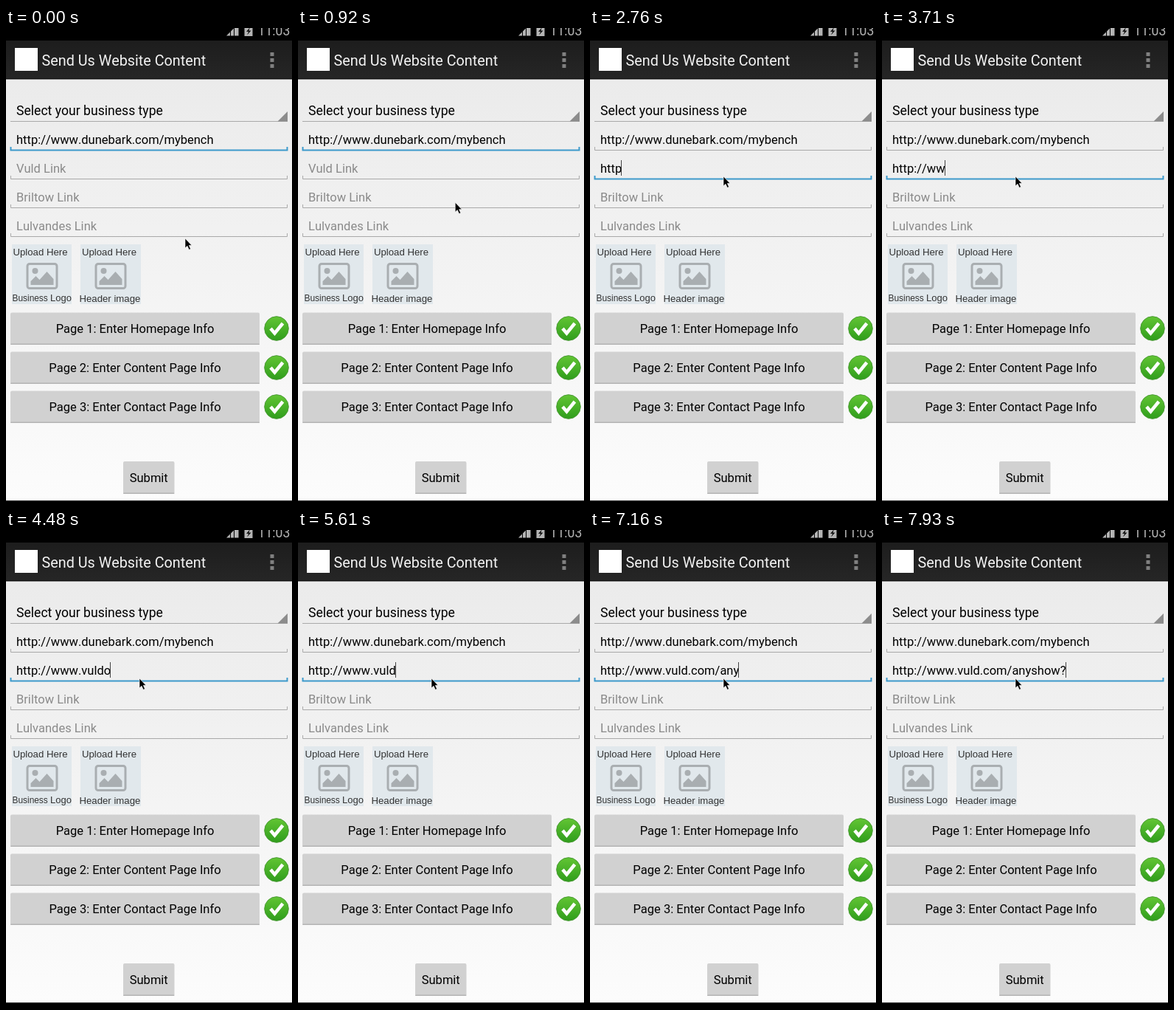
An HTML page for the animation above (8000 ms loop, 388 px wide and 642 px high).

```html
<!DOCTYPE html>
<html lang="en">
<head>
<meta charset="utf-8">
<title>Website content form</title>
<style>
  html, body { margin: 0; width: 100%; height: 100%; overflow: hidden; background: #f4f4f4; }
  svg { display: block; width: 388px; height: 642px; }
  text { font-family: Roboto, sans-serif; font-size: 16.5px; font-kerning: none; white-space: pre; }
  .thumb text { font-family: "Liberation Sans", Arial, sans-serif; font-size: 13.2px; fill: #333; }
  .mid { text-anchor: middle; }
  .hint { fill: #8a8a8a; }
  .line { fill: none; stroke: #a9a9a9; stroke-width: 1; }
  .focus { stroke: #3d9acb; stroke-width: 2; }
</style>
</head>
<body>
<svg viewBox="0 0 388 642" xmlns="http://www.w3.org/2000/svg">
  <defs>
    <linearGradient id="page" x2="0" y2="1">
      <stop offset="0" stop-color="#e9e9e9"/>
      <stop offset="1" stop-color="#fcfcfc"/>
    </linearGradient>
    <linearGradient id="bar" x2="0" y2="1">
      <stop offset="0" stop-color="#1d1d1d"/>
      <stop offset="1" stop-color="#262626"/>
    </linearGradient>
    <linearGradient id="green" x2="0" y2="1">
      <stop offset="0" stop-color="#62c534"/>
      <stop offset="1" stop-color="#2f9d1c"/>
    </linearGradient>
    <g id="picture" fill="#a9aeb1">
      <rect x="1.5" y="1.5" width="40" height="33" rx="3" fill="none" stroke="#a9aeb1" stroke-width="3"/>
      <circle cx="12" cy="11" r="4"/>
      <path d="M6 30V25L13 18L18 23L28 12L37 22V30Z"/>
    </g>
    <g id="tick">
      <circle r="16.3" fill="url(#green)" stroke="#4a9a35" stroke-width="1"/>
      <path d="M-8 0L-2.5 6.5L8.5 -7" fill="none" stroke="#fff" stroke-width="4.6"/>
    </g>
  </defs>

  <rect width="388" height="642" fill="url(#page)"/>
  <rect width="388" height="17" fill="#000"/>
  <g fill="#b4b4b4">
    <path d="M299 10.5L304 5.5V10.5ZM305 10.5V4.5L309 .5V10.5ZM310 10.5V0H315.500V10.500Z"/>
    <rect x="323.500" y="-3" width="11" height="14"/>
    <path d="M331 -1L326 5H329L327 9.500L332.500 3.500H329.500Z" fill="#111"/>
    <text x="341.500" y="9.500" style="font-size:17.600px">11:03</text>
  </g>

  <rect y="17" width="388" height="52" fill="url(#bar)"/>
  <rect y="68" width="388" height="1.500" fill="#111"/>
  <rect x="12" y="27" width="31" height="31" fill="#fff"/>
  <text x="48.500" y="51" fill="#f3f3f3" style="font-size:19.800px">Send Us Website Content</text>
  <path d="M358.500 33h5v5h-5zM358.500 41h5v5h-5zM358.500 49h5v5h-5z" fill="#808080"/>

  <text x="14" y="118" style="font-size:17.600px">Select your business type</text>
  <path class="line" d="M6 126.500H382"/>
  <path d="M382 113V126.500H368.500Z" fill="#8c8c8c"/>

  <g id="fields"></g>

  <g class="thumb">
    <rect x="8" y="293" width="81" height="81" fill="#e1e8ec"/>
    <text x="9.500" y="308">Upload Here</text>
    <use href="#picture" x="27.500" y="318"/>
    <text x="8.500" y="370" style="font-size:11.900px">Business</text>
    <text x="60" y="370" style="font-size:13px">Logo</text>
  </g>
  <g class="thumb">
    <rect x="101" y="293" width="82" height="81" fill="#e1e8ec"/>
    <text x="103" y="308">Upload Here</text>
    <use href="#picture" x="120.500" y="318"/>
    <text x="99.500" y="371">Header image</text>
  </g>

  <g id="buttons"></g>
  <rect y="640" width="388" height="2" fill="#000"/>

  <path id="pointer" d="M0 0V13L3 10.300L5.300 15.300L7.500 14.300L5.300 9.500H9Z"
        fill="#000" stroke="#fff" stroke-width=".6"/>
</svg>

<script>
const LOOP = 8000;
const FOCUS_AT = 1400;
const NS = "http://www.w3.org/2000/svg";
const LEFT = 14;

function add(parent, name, attrs, content = "") {
  const node = document.createElementNS(NS, name);
  for (const key in attrs) node.setAttribute(key, attrs[key]);
  node.textContent = content;
  return parent.appendChild(node);
}

const fieldBox = document.getElementById("fields");
const fields = ["http://www.dunebark.com/mybench", "Vuld Link", "Briltow Link", "Lulvandes Link"]
  .map((label, i) => {
    const y = 157 + 39 * i;
    return {
      line: add(fieldBox, "path", { class: "line", d: `M6.5 ${y + 4}V${y + 8.5}H381.500V${y + 4}` }),
      text: add(fieldBox, "text", { x: LEFT, y, class: i ? "hint" : "" }, label),
      caret: add(fieldBox, "rect", { y: y - 17, width: 1, height: 21, fill: "#444" })
    };
  });

const buttonBox = document.getElementById("buttons");
function button(x, y, w, h, label) {
  add(buttonBox, "rect", { x, y, width: w, height: h, rx: 2, fill: "#d1d1d1" });
  add(buttonBox, "rect", { x, y: y + h - 1.5, width: w, height: 1.5, rx: 0.7, fill: "#b3b3b3" });
  add(buttonBox, "text", { x: x + w / 2, y: y + h / 2 + 5.5, class: "mid" }, label);
}
["Homepage", "Content Page", "Contact Page"].forEach((name, i) => {
  const y = 385.5 + 53 * i;
  button(6, y, 338, 43.5, `Page ${i + 1}: Enter ${name} Info`);
  add(buttonBox, "use", { href: "#tick", x: 367, y: y + 21.5 });
});
button(159, 587, 69.5, 44, "Submit");

// "<" is a backspace
const keys = [
  [2350, "h"], [2520, "t"], [2640, "t"], [2760, "p"], [3000, ":"], [3240, "/"], [3360, "/"],
  [3530, "w"], [3710, "w"], [3890, "w"], [3950, "."], [4190, "v"], [4310, "u"], [4370, "ld"],
  [4480, "o"], [5020, "<"], [5370, "o"], [5610, "<"], [5850, "."], [6090, "c"], [6210, "o"],
  [6270, "m"], [6500, "/"], [6860, "a"], [7040, "n"], [7160, "y"], [7390, "s"], [7450, "h"],
  [7630, "o"], [7810, "w"], [7930, "?"]
];

// time, x, y
const path = [
  [0, 243, 285], [60, 243, 285], [210, 244, 295], [580, 244, 295],
  [1220, 188, 188], [1700, 188, 188], [1930, 181, 201], [LOOP, 181, 201]
];

function typed(t) {
  let out = "";
  for (const [at, key] of keys) {
    if (at > t) break;
    out = key === "<" ? out.slice(0, -1) : out + key;
  }
  return out;
}

function pointerAt(t) {
  const i = path.findIndex(p => p[0] > t);
  const [t0, x0, y0] = path[i - 1], [t1, x1, y1] = path[i];
  const k = (t - t0) / (t1 - t0), e = k * k * (3 - 2 * k);
  return [x0 + (x1 - x0) * e, y0 + (y1 - y0) * e];
}

function showCaret(field, on) {
  field.caret.style.display = on ? "" : "none";
  if (on) field.caret.setAttribute("x", Math.floor(LEFT - 0.5 + field.text.getComputedTextLength()));
}

const pointer = document.getElementById("pointer");
const [first, second] = fields;

function draw(t) {
  const moved = t >= FOCUS_AT;
  const value = typed(t);
  first.line.classList.toggle("focus", !moved);
  second.line.classList.toggle("focus", moved);
  second.text.textContent = value || "Vuld Link";
  second.text.classList.toggle("hint", !value);
  showCaret(first, !moved && (t >= 150 && t < 650 || t >= 1150));
  showCaret(second, value !== "");
  pointer.setAttribute("transform", `translate(${pointerAt(t).join(" ")})`);
}

fields.forEach(f => showCaret(f, false));
const start = performance.now();
function tick(now) {
  draw(Math.max(0, now - start) % LOOP);
  requestAnimationFrame(tick);
}
draw(0);
requestAnimationFrame(tick);
</script>
</body>
</html>
```
